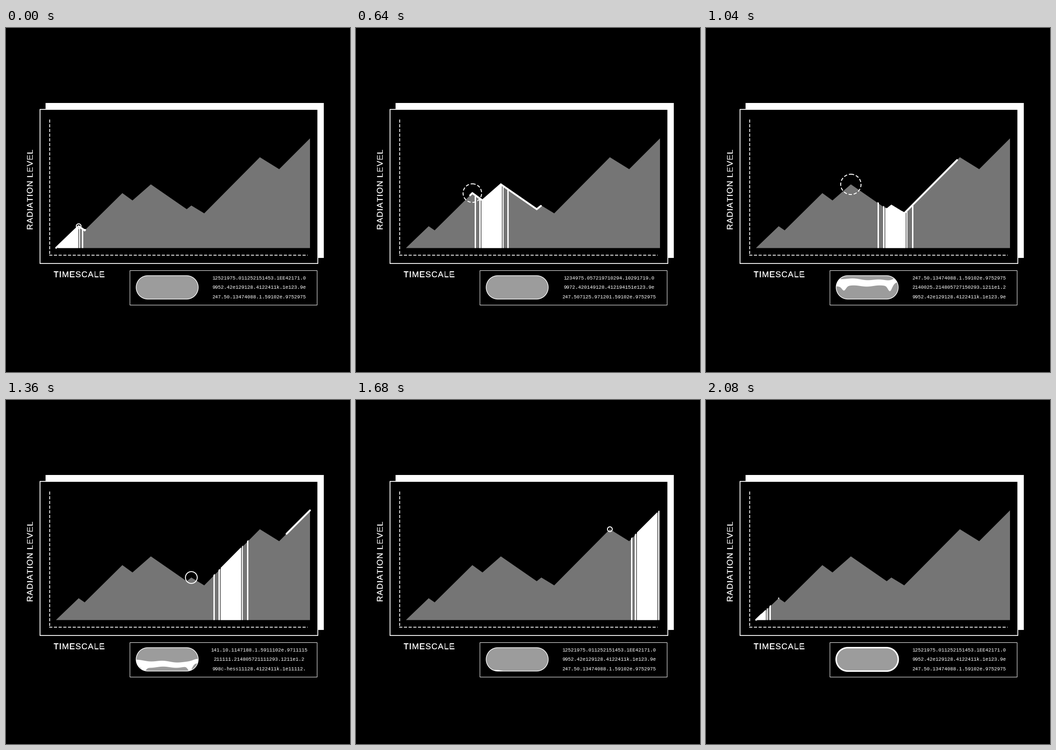
A matplotlib script that plays this animation: 748x748 px, repeating every 2.16 s.

```python
import numpy as np
import matplotlib.pyplot as plt
from matplotlib.animation import FuncAnimation
from matplotlib.patches import Circle, PathPatch, Polygon, Rectangle
from matplotlib.textpath import TextPath
from matplotlib.transforms import Affine2D

SIZE, DPI = 748, 100
FRAMES, STEP_MS = 27, 80
PT = 72 / DPI  # points per pixel
WHITE, BLACK = "white", "black"
HILL_GREY, PILL_GREY = "#757575", "#9c9c9c"

RIDGE = np.array([
    (109, 478), (158, 431), (171, 440), (253, 359), (275, 375), (315, 340),
    (393, 394), (403, 386), (431, 403), (552, 281), (594, 307), (661, 240)])
FLOOR = 478.5

# Key points as (step, x); negative steps lead into the loop.
SWEEP = [(-2, 81), (0, 135), (10, 335), (13, 412), (17, 489), (24, 741)]
LEAD = [(-2, 109), (-1, 121), (0, 172), (17, 661)]
SWEEP_WIDTH = 44

# Ridge corner and the step at which its ring starts
RINGS = [(1, -1.1), (3, 3.75), (5, 8.35), (7, 14.3), (9, 19.9)]
RING_SPEED, RING_LIFE, RING_DASH_AGE = 4.75, 6.2, 3.6

ROW_A = "12521975.011252151453.1EE42171.0"
ROW_B = "9952.42e129128.4122411k.1e123.9e"
ROW_C = "247.50.13474088.1.59102e.9752975"
CODE_1 = (ROW_A, ROW_B, ROW_C)
CODE_2 = ("141.10.1147188.1.5911102e.9711115",
          "211111.214805721111293.1211e1.2",
          "998c-hess11128.4122411k.1e11112.")
CODE_3 = ("1234975.057219710294.10291719.0",
          "9972.420149128.412194151e123.9e",
          "247.507125.971201.59102e.9752975")
CODE_4 = (ROW_C, "2140025.214805727150293.1211e1.2", ROW_B)
CODE_CUES = [(-2, CODE_1), (3, CODE_2), (8, CODE_3), (12, CODE_4),
             (15, CODE_2), (19, CODE_1)]

fig = plt.figure(figsize=(SIZE / DPI, SIZE / DPI), dpi=DPI, facecolor=BLACK)
ax = fig.add_axes([0, 0, 1, 1])
ax.set_xlim(0, SIZE)
ax.set_ylim(SIZE, 0)
ax.axis("off")


def key(keys, step):
    return np.interp(step, *zip(*keys))


def bump(x, mid, width):
    return np.exp(-((x - mid) / width) ** 2)


def box(x0, y0, x1, y1, **style):
    return ax.add_patch(Rectangle((x0, y0), x1 - x0, y1 - y0, **style))


def shape(points, **style):
    return ax.add_patch(Polygon(points, **style))


def tracked(text, x, y, size, tracking, angle=0):
    """Draw letterspaced text from its baseline start."""
    def glyph(chars):
        return TextPath((0, 0), chars, size=size, prop={"family": "Liberation Sans"})

    ref = glyph("H").vertices[:, 0].max()
    pen = 0
    for ch in text:
        if ch != " ":
            place = Affine2D().translate(pen, 0).scale(1, -1).rotate_deg(angle).translate(x, y)
            ax.add_patch(PathPatch(glyph(ch).transformed(place), fc=WHITE,
                                   ec=WHITE, lw=0.3 * PT, zorder=3))
        pen += glyph(ch + "H").vertices[:, 0].max() - ref + tracking


def hill_outline(lift=0, right=661):
    top = RIDGE - (0, lift)
    return np.vstack([top, (right, top[-1, 1]), (right, FLOOR), (RIDGE[0, 0], FLOOR)])


def capsule(x0, y0, x1, y1):
    r = (y1 - y0) / 2
    a = np.linspace(0, 2 * np.pi, 120, endpoint=False) + 0.01
    half = (x1 - x0) / 2 - r
    return np.column_stack([(x0 + x1) / 2 + half * np.sign(np.cos(a)) + r * np.cos(a),
                            (y0 + y1) / 2 + r * np.sin(a)])


# Panel, axes and labels
box(86, 163, 691, 500, fc=WHITE, lw=0)
box(74, 177, 678, 512, fc=BLACK, ec=WHITE, lw=1.8 * PT)
dash = dict(color=WHITE, lw=1.7 * PT, dashes=(4, 2), dash_capstyle="butt")
ax.plot([94.8, 94.8], [199, 493.5], **dash)
ax.plot([94, 656], [493.5, 493.5], **dash)
tracked("TIMESCALE", 103.5, 541.8, 18, 1.1)
tracked("RADIATION LEVEL", 58, 439, 18, 1.1, -90)

# Hills, sweep, trace and rings
shape(hill_outline(), fc=HILL_GREY, lw=0, zorder=2)
mask = shape(hill_outline(lift=2, right=662), fc="none", lw=0)
bars = [box(0, 200, 1, FLOOR, fc=WHITE, lw=0, zorder=3) for _ in range(5)]
for bar in bars:
    bar.set_clip_path(mask)
trace, = ax.plot([], [], color=WHITE, lw=4 * PT, solid_capstyle="round",
                 solid_joinstyle="miter", zorder=4)
rings = [ax.add_patch(Circle(RIDGE[i], 1, fill=False, ec=WHITE, lw=2 * PT, zorder=5))
         for i, _ in RINGS]

# Readout
box(269.5, 526.5, 676.5, 601.5, fc=BLACK, ec=WHITE, lw=PT)
pill_pts = capsule(283, 538.5, 418, 589.5)
pill = shape(pill_pts, fc=PILL_GREY, lw=0, zorder=2)
liquid = shape(pill_pts, fc=WHITE, lw=0, zorder=3)
liquid.set_clip_path(pill)
rim = shape(pill_pts, fc="none", ec=WHITE, zorder=4)
rows = [ax.text(550.5, y, "", color=WHITE, family="Liberation Mono",
                size=10.6 * PT, ha="center", va="baseline", zorder=3)
        for y in (547, 567, 588)]


def move_bars(step):
    mid = key(SWEEP, step)
    left, right = mid - SWEEP_WIDTH / 2, mid + SWEEP_WIDTH / 2
    gap = 8 + 6 * np.sin(np.pi * step / FRAMES) ** 2
    spans = [(left, SWEEP_WIDTH), (left - 4.5, 2.4), (right + 2.1, 2.4),
             (left - gap - 3, 3), (right + gap, 3)]
    for bar, (x, w) in zip(bars, spans):
        bar.set_x(x)
        bar.set_width(w)


def move_trace(step):
    start, end = RIDGE[0, 0], RIDGE[-1, 0]
    a = start + (end - start) * np.clip(step / 18, 0, 1) ** 1.7
    b = key(LEAD, step)
    if b - a < 0.5:
        trace.set_data([], [])
        return
    inner = RIDGE[:, 0][(RIDGE[:, 0] > a) & (RIDGE[:, 0] < b)]
    xs = np.concatenate([[a], inner, [b]])
    trace.set_data(xs, np.interp(xs, RIDGE[:, 0], RIDGE[:, 1]))


def move_rings(step):
    for ring, (_, start) in zip(rings, RINGS):
        age = step - start
        ring.set_visible(0 < age < RING_LIFE)
        ring.set_radius(max(age, 0) * RING_SPEED)
        ring.set_linestyle((0, (3.6, 2)) if age > RING_DASH_AGE else "-")


def move_liquid(step):
    """A falling band with a drip near each end and a crest on the right."""
    x = np.arange(283, 419)
    ripple = 1.3 * np.sin(x / 9 + step)
    crest = 9 * bump(x, 418, 14)
    top = 547 + 5.4 * (step - 13) + 0.04 * (x - 350) + ripple - crest
    drips = 9 * bump(x, 300, 6) + 12 * bump(x, 400, 6)
    bottom = 546 + 5 * (step - 10) + ripple + drips * np.clip((step - 8) / 4, 0, 1) - crest
    liquid.set_xy(np.vstack([np.column_stack([x, top]),
                             np.column_stack([x, np.maximum(top, bottom)])[::-1]]))
    liquid.set_visible(8 < step < 23)
    rim.set_linewidth((3.2 if step < 0 else 1.4) * PT)


def update(frame):
    step = frame if frame < FRAMES - 2 else frame - FRAMES
    move_bars(step)
    move_trace(step)
    move_rings(step)
    move_liquid(step)
    code = [lines for start, lines in CODE_CUES if start <= step][-1]
    for row, line in zip(rows, code):
        row.set_text(line)
    return []


anim = FuncAnimation(fig, update, frames=FRAMES, interval=STEP_MS,
                     repeat=True, repeat_delay=0, blit=False)
plt.show()
```
